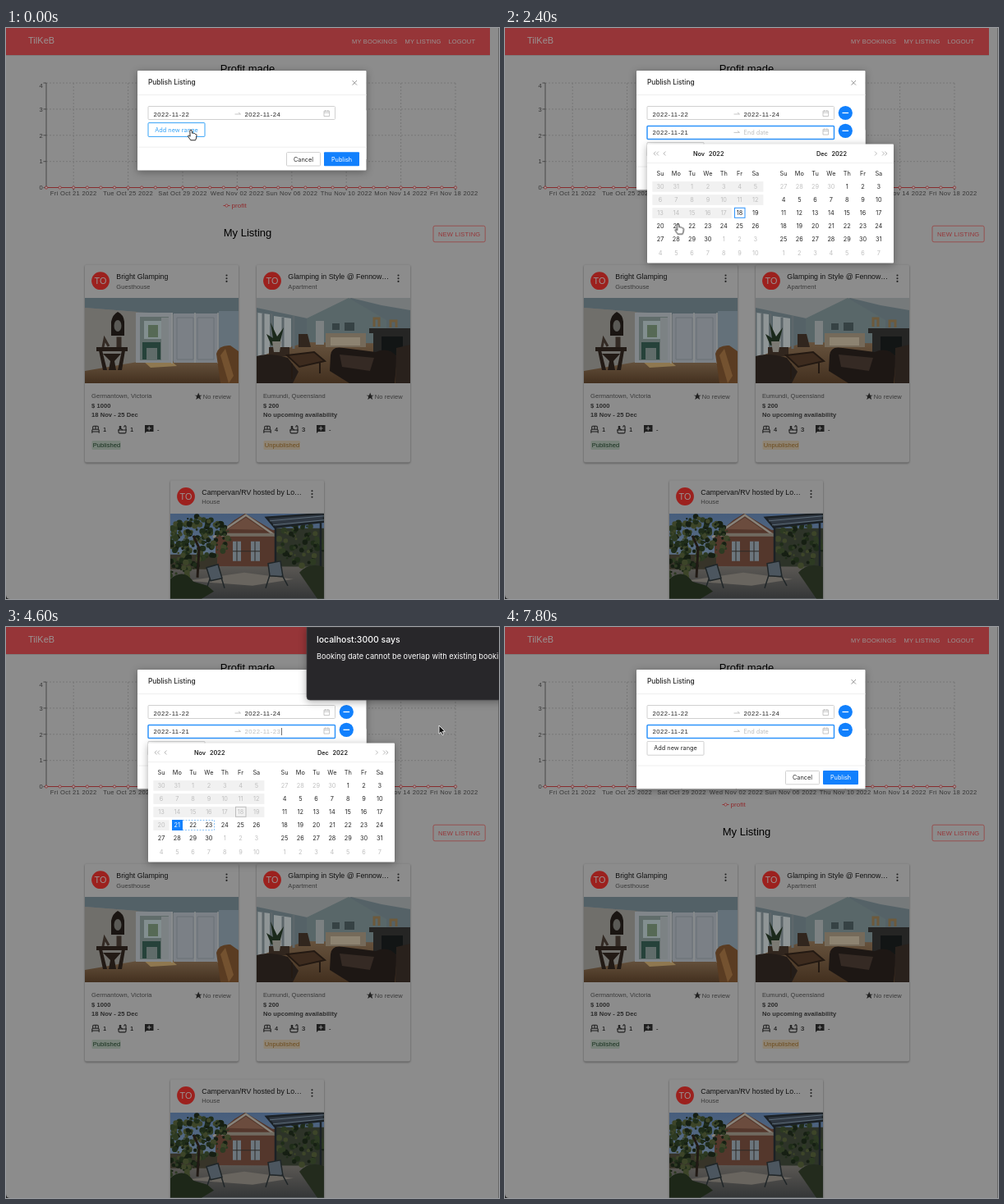
These frames come from a looping animation (600 px wide and 696 px high, 7.9 s). An HTML page:

```html
<!DOCTYPE html>
<html lang="en">
<head>
<meta charset="utf-8">
<title>Publish listing</title>
<style>
html, body { margin: 0; width: 100%; height: 100%; overflow: hidden; background: #8c8c8c; }
svg { display: block; width: 600px; height: 696px; }
text { font: 7.5px "Liberation Sans", Arial, sans-serif; letter-spacing: .08px; white-space: pre; }
.ui text { font: 7.3px Inter, "Open Sans", sans-serif; letter-spacing: 0; fill: #262626; }
.ui .date { font: 7.7px "Liberation Sans", Arial, sans-serif; letter-spacing: .5px; }
.ui .hint { fill: #bfbfbf; }
.ui .strong { font-weight: 600; }
.ui .title { font-size: 8.3px; font-weight: 500; }
.ui .light { fill: #fff; }
.mid { text-anchor: middle; }
.end { text-anchor: end; }
.h1 { font-size: 13px; letter-spacing: 0; }
.nav { font-size: 7.5px; letter-spacing: .17px; fill: #9a9494; }
.axis { font-size: 7.6px; letter-spacing: .3px; fill: #363636; }
.name { font-size: 8.8px; letter-spacing: 0; fill: #121212; }
.soft { fill: #393939; }
.bold { font-weight: bold; fill: #2a2a2a; }
.card { filter: drop-shadow(0 1px 1px #0006); }
.float { filter: drop-shadow(0 2px 5px #0005); }

.t { animation: 7.9s step-end infinite; }
.row2 { animation-name: row2; }
.grow { animation-name: grow; }
.ring { animation-name: ring; }
.addBox { animation-name: addBox; }
.ui .addText { animation-name: addText; }
.startHint { animation-name: startHint; }
.startHover { animation-name: startHover; }
.startSet { animation-name: startSet; }
.endHint { animation-name: endHint; }
.endHover { animation-name: endHover; }
.picker { animation-name: picker; }
.before { animation-name: before; }
.after { animation-name: after; }
.range { animation-name: range; }
.alert { animation-name: alert; }
.hand { animation-name: hand; }
.beam { animation-name: beam; }
.arrow { animation-name: arrow; }
.pointer { animation: move 7.9s ease-in-out infinite; }

@keyframes row2 { 0% { opacity: 0 } 6.33%, 100% { opacity: 1 } }
@keyframes grow { 0% { transform: none } 6.33%, 100% { transform: translateY(23.8px) } }
@keyframes ring { 0% { stroke: #d0d0d0; stroke-width: 1px } 15.2%, 100% { stroke: #2f94fb; stroke-width: 1.5px } }
@keyframes addBox { 0% { stroke: #36a3f7 } 15.2%, 100% { stroke: #d0d0d0 } }
@keyframes addText { 0% { fill: #36a3f7 } 15.2%, 100% { fill: #262626 } }
@keyframes startHint { 0% { opacity: 1 } 24.05%, 100% { opacity: 0 } }
@keyframes startHover { 0% { opacity: 0 } 24.05% { opacity: 1 } 30.2%, 100% { opacity: 0 } }
@keyframes startSet { 0% { opacity: 0 } 30.2%, 100% { opacity: 1 } }
@keyframes endHint { 0% { opacity: 1 } 38% { opacity: 0 } 79.75%, 100% { opacity: 1 } }
@keyframes endHover { 0% { opacity: 0 } 38% { opacity: 1 } 79.75%, 100% { opacity: 0 } }
@keyframes picker { 0% { opacity: 0 } 16.46% { opacity: 1 } 81%, 100% { opacity: 0 } }
@keyframes before { 0% { opacity: 1 } 31.6%, 100% { opacity: 0 } }
@keyframes after { 0% { opacity: 0 } 31.6%, 100% { opacity: 1 } }
@keyframes range { 0% { opacity: 0 } 38%, 100% { opacity: 1 } }
@keyframes alert { 0% { opacity: 0 } 43% { opacity: 1 } 79.75%, 100% { opacity: 0 } }
@keyframes hand { 0% { opacity: 1 } 6.33% { opacity: 0 } 24.05% { opacity: 1 } 43%, 100% { opacity: 0 } }
@keyframes beam { 0% { opacity: 0 } 6.33% { opacity: 1 } 20.2%, 100% { opacity: 0 } }
@keyframes arrow { 0% { opacity: 0 } 20.2% { opacity: 1 } 24.05% { opacity: 0 } 43%, 100% { opacity: 1 } }
@keyframes move {
  0%, 18.9% { transform: translate(225px, 124px) }
  26.5%, 32.9% { transform: translate(210.5px, 238.5px) }
  39%, 46.8% { transform: translate(245px, 246px) }
  56.9%, 59.5% { transform: translate(527px, 120px) }
  64%, 100% { transform: translate(612px, 50px) }
}
</style>
</head>
<body>
<svg viewBox="0 0 600 696">
  <defs>
    <clipPath id="frame"><path d="M0 0H187V104H0z"/></clipPath>
    <linearGradient id="floor" x2="0" y2="1"><stop stop-color="#66523d"/><stop offset="1" stop-color="#43301f"/></linearGradient>
    <linearGradient id="sky" x2="0" y2="1"><stop stop-color="#465d7c"/><stop offset="1" stop-color="#74838f"/></linearGradient>
    <linearGradient id="patio" x2="0" y2="1"><stop stop-color="#5b5854"/><stop offset="1" stop-color="#343637"/></linearGradient>
    <g id="minus"><circle r="8.6" fill="#1180fd"/><path d="M-3.8 0H3.8" stroke="#fff" stroke-width="1.3"/></g>
    <g id="field" fill="none" stroke="#b8b8b8" stroke-width=".8">
      <path d="M278.5 105H285.5L283 103M387 101.2H393.6V107.6H387zM387 103.2H393.6M388.8 100V102M391.8 100V102"/>
    </g>
    <g id="icons" fill="none" stroke="#1f1f1f" stroke-width="1.1">
      <path d="M9.7 201V198Q9.700 196.800 10.900 196.800H15.100Q16.300 196.800 16.300 198V201M13 197V200.500M8.800 205.300V202Q8.800 200.700 10 200.700H16Q17.200 200.700 17.200 202V205.300M8.800 203.500H17.200"/>
      <path d="M40 201.500H51M41 202V204Q41 205.400 42.500 205.400H48.500Q50 205.400 50 204V197.500Q49.800 196 48.500 196.300L47.500 198"/>
      <path d="M41.500 201Q42 199.500 44 200L46 201.500" />
      <circle cx="43" cy="198" r=".9" fill="#1f1f1f"/>
      <path d="M73 195.500H83.500V203.500H75L73 205.500z" fill="#1f1f1f" stroke="none"/>
      <path d="M78.200 197V202M75.700 199.500H80.700" stroke="#8c8c8c"/>
    </g>

    <g id="hall" clip-path="url(#frame)">
      <path d="M0 0H187V104H0z" fill="#6a7073"/>
      <path d="M0 0H187V20H107L64 17 0 12z" fill="#536167"/>
      <path d="M0 12L64 17V80L0 96z" fill="#706f6b"/>
      <path d="M0 89L64 78 162 77 187 84V104H0z" fill="url(#floor)"/>
      <path d="M70 76L104 76 112 83 80 85z" fill="#8f7850"/>
      <path d="M62 18H107V79H62z" fill="#81868a"/>
      <path d="M67 23H102V76H67z" fill="#606c6a"/>
      <path d="M72 28H94V50H72z" fill="#828e8f"/>
      <path d="M77 33H89V48H77z" fill="#566955"/>
      <path d="M70 54H92V75H88V61H75V75H70z" fill="#26423a"/>
      <path d="M93 24H102V76H93z" fill="#7c8284"/>
      <path d="M108 19H162V79H108z" fill="#7b8086"/>
      <path d="M112 24H132V75H112zM137 24H157V75H137z" fill="none" stroke="#6b7177"/>
      <path d="M134 18V79M106 18V80M162 18V80" stroke="#8b8d8f" stroke-width="1.500"/>
      <path d="M163 16H187V85L163 78z" fill="#64717a"/>
      <path d="M32 46V29Q34 20 40 17Q47 20 48 29V46z" fill="#1a1512"/>
      <ellipse cx="40" cy="34" rx="4.500" ry="7" fill="#5a5a56"/>
      <path d="M14 60H52V65H14zM17 64H21L27 88H22zM45 64H49L45 88H40zM22 68H44L36 77 38 88H29L31 77z" fill="#221a15"/>
      <path d="M22 60L24 50 29 59M40 60V49H43V60" fill="none" stroke="#332a24" stroke-width="3"/>
      <path d="M160 68Q163 57 177 58L187 65V104H165z" fill="#5a3c22"/>
      <path d="M165 70L171 62 181 95 175 104z" fill="#745230"/>
    </g>
    <g id="lounge" clip-path="url(#frame)">
      <path d="M0 0H187V104H0z" fill="#556267"/>
      <path d="M0 0H187V15L152 9 115 0 62 25 0 12z" fill="#767a7b"/>
      <path d="M61 25L112 0 158 27V55H61z" fill="#596769"/>
      <path d="M0 70L63 54 187 56V104H0z" fill="url(#floor)"/>
      <path d="M1 18L16 20V67L1 73zM21 22L42 25V60L21 66z" fill="#8f9596"/>
      <path d="M0 17V75M18 19V70M45 22V62M8 19V69M32 24V62" stroke="#5d666a" stroke-width="3"/>
      <path d="M72 28H82V57H72z" fill="#7c8182"/>
      <path d="M84 43H133V60H84z" fill="#756a5a"/>
      <path d="M90 48H126V58H90z" fill="#8d8371"/>
      <path d="M92 31H101V39H92zM107 30H119V40H107z" fill="#364244"/>
      <path d="M137 37H187V43H137zM142 43H187V73H142z" fill="#252524"/>
      <path d="M152 47H178V70H152z" fill="#121515"/>
      <path d="M143 35V25H149V35M163 36V28H170V36" fill="none" stroke="#6d5a3c" stroke-width="3"/>
      <path d="M51 44H62L66 60H51zM15 60H40V71H15z" fill="#31261e"/>
      <path d="M18 58L12 44 20 49 17 30 25 47 33 36 28 56z" fill="#1b291b"/>
      <path d="M19 53H30L28 66H21z" fill="#7b7a73"/>
      <path d="M0 71Q15 66 38 73L51 90 44 104H0z" fill="#231c18"/>
      <path d="M37 70L70 66 83 77 52 84zM43 80V99M77 78V92" fill="#3d2b1e" stroke="#231912" stroke-width="2"/>
      <path d="M90 70Q91 58 106 61L145 66Q161 59 171 72L168 104H113L89 89z" fill="#1d1714"/>
      <path d="M101 69L143 73 138 89 104 84z" fill="#352a24"/>
      <path d="M170 61L187 57V104H169z" fill="#29211c"/>
    </g>
    <g id="cottage" clip-path="url(#frame)">
      <path d="M0 0H187V104H0z" fill="url(#sky)"/>
      <path d="M55 28L78 8 91 0 124 20 187 24V76H55z" fill="#54372c"/>
      <path d="M52 29L92 2 132 30" fill="none" stroke="#88837a" stroke-width="2.500"/>
      <path d="M70 19L92 5 114 20z" fill="#6b4c3e"/>
      <path d="M62 24H127V28H62z" fill="#706a60"/>
      <path d="M76 34H86V58H76zM98 34H109V58H98z" fill="#6c767d"/>
      <path d="M81 34V58M103 34V58M76 46H109" stroke="#2c2926"/>
      <path d="M128 18H187V67H128z" fill="#2d3328"/>
      <path d="M0 64L187 65V104H0z" fill="url(#patio)"/>
      <path d="M0 50H57V68H0z" fill="#373429"/>
      <path d="M20 82L90 72 150 80 100 88z" fill="#69655f"/>
      <g id="leaves"></g>
      <path d="M33 78L35 42 28 27" fill="none" stroke="#211a15" stroke-width="3"/>
      <path d="M117 5L187 0V10L127 17zM128 16V72M183 10V84" fill="#2e3640" stroke="#1b2125" stroke-width="2.500"/>
      <path d="M121 9L187 3M125 14L187 8" stroke="#5b6a76"/>
      <path d="M44 66L58 62 63 79 49 82zM48 80L44 92M62 78L66 91M119 61L134 58 137 77 121 76zM121 75L116 91M136 75L143 88" fill="#4c565f" stroke="#202628" stroke-width="1.500"/>
      <path d="M0 80Q16 66 28 83L45 88 53 95 38 104H0z" fill="#1d2718"/>
      <path d="M157 72Q168 59 187 65V104H179z" fill="#232b1d"/>
    </g>
  </defs>

  <rect width="600" height="696" fill="#8c8c8c"/>
  <rect width="589" height="33" fill="#963538"/>
  <path d="M0 33.500H589" stroke="#777" opacity=".6"/>
  <path d="M599.500 0V696" stroke="#686868"/>
  <path d="M0 691Q0 696 5 696H0z" fill="#222"/>
  <text x="27" y="19" style="font-size:10.900px;fill:#9a9494">TilKeB</text>
  <text class="nav" x="421" y="18.500">MY BOOKINGS</text>
  <text class="nav" x="485.500" y="18.500">MY LISTING</text>
  <text class="nav" x="538.500" y="18.500">LOGOUT</text>
  <text class="h1 mid" x="294" y="54">Profit made</text>
  <g id="chart"></g>
  <text class="h1 mid" x="294" y="253.600">My Listing</text>
  <rect x="520" y="241.200" width="63.200" height="19.600" rx="2" fill="none" stroke="#98403f" stroke-width=".8"/>
  <text class="mid" x="551.700" y="253.800" style="font-size:7.600px;letter-spacing:.2px;fill:#963538">NEW LISTING</text>
  <g id="cards"></g>

  <g class="ui">
    <g class="float">
      <path d="M160 53Q160 52 161 52H437.500Q438.500 52 438.500 53V160H160z" fill="#fff"/>
      <rect class="t grow" x="160" y="100" width="278.500" height="73.500" rx="1" fill="#fff"/>
    </g>
    <text class="title" x="173" y="69.300">Publish Listing</text>
    <path d="M421.500 64L427 69.500M427 64L421.500 69.500" stroke="#8c8c8c" stroke-width=".9"/>
    <path d="M160 81.500H438.500" stroke="#efefef"/>
    <rect x="173" y="95.500" width="227.500" height="16" rx="1" fill="#fff" stroke="#d0d0d0"/>
    <use href="#field"/>
    <text class="date" x="179.500" y="107.700">2022-11-22</text>
    <text class="date" x="290.500" y="107.700">2022-11-24</text>
    <g class="t grow">
      <rect class="t addBox" x="173" y="115.600" width="69" height="16.800" rx="1" fill="#fff"/>
      <text class="t addText mid" x="207.500" y="126.700">Add new range</text>
      <path d="M160 145.200H438.500" stroke="#efefef"/>
      <rect x="341.500" y="151.600" width="41" height="16.400" rx="1" fill="#fff" stroke="#d0d0d0"/>
      <text class="mid" x="362" y="162.600">Cancel</text>
      <rect x="387" y="151.300" width="43" height="17" rx="1" fill="#1180fd"/>
      <text class="mid light" x="408.500" y="162.600">Publish</text>
    </g>
    <g class="t row2">
      <use href="#minus" x="414.300" y="103.500"/>
      <use href="#minus" x="414.300" y="125.300"/>
      <rect class="t ring" x="173" y="119.500" width="227.500" height="16" rx="1" fill="#fff"/>
      <use href="#field" y="22.400"/>
      <text class="t startHint hint" x="179.500" y="130.200">Start date</text>
      <text class="t startHover date hint" x="179.500" y="130.200">2022-11-21</text>
      <text class="t startSet date" x="179.500" y="130.200">2022-11-21</text>
      <text class="t endHint hint" x="290.500" y="130.200">End date</text>
      <g class="t endHover">
        <text class="date hint" x="290.500" y="130.200">2022-11-23</text>
        <path d="M335.500 123V132" stroke="#333" stroke-width=".7"/>
      </g>
    </g>
    <g class="t picker">
      <rect class="float" x="173" y="141.500" width="300" height="145" rx="1" fill="#fff"/>
      <path d="M173 164.500H473" stroke="#f0f0f0"/>
      <path d="M183.500 150.500L181 153 183.500 155.500M187 150.500L184.500 153 187 155.500M195.500 150.500L193 153 195.500 155.500M450 150.500L452.500 153 450 155.500M459 150.500L461.500 153 459 155.500M462.500 150.500L465 153 462.500 155.500" fill="none" stroke="#aaa" stroke-width=".8"/>
      <text class="strong" x="229" y="155.500">Nov</text><text class="strong" x="248" y="155.500">2022</text>
      <text class="strong" x="379" y="155.500">Dec</text><text class="strong" x="397.500" y="155.500">2022</text>
      <g id="december"></g>
      <g class="t before" id="november"></g>
      <g class="t after">
        <g id="chosen"></g>
        <rect x="202" y="235" width="13" height="13" fill="#1180fd"/>
        <text class="mid light" x="208.300" y="244.300">21</text>
        <path class="t range" d="M215 235.500H253.500V247.500H215" fill="none" stroke="#7dbcf5" stroke-width=".9" stroke-dasharray="2 1.500"/>
      </g>
    </g>
    <g class="t alert">
      <path class="float" d="M366 0H604V89H370Q366 89 366 85z" fill="#28272a" stroke="#4a494c" stroke-width=".7"/>
      <text class="light" x="378" y="18.800" style="font-size:10.500px;font-weight:500">localhost:3000 says</text>
      <text class="light" x="378" y="39.300" style="font-size:9.200px">Booking date cannot be overlap with existing booking</text>
    </g>
  </g>

  <g class="pointer">
    <path class="t hand" d="M-1.200 .8Q0-.8 1.200 .8L1.600 4.300Q2.800 3.600 3.500 4.600Q4.800 4.200 5.300 5.300Q6.800 5 7 6.600L6.600 10 5.600 12.800H-.2L-3.200 8.500Q-4 7-2.400 7L-.9 8.200z" fill="#fff" stroke="#111" stroke-width=".9"/>
    <path class="t beam" d="M-2-5.500Q0-5.500 0-4Q0-5.500 2-5.500M0-4.500V6M-2 7Q0 7 0 5.500Q0 7 2 7" fill="none" stroke="#111" stroke-width="1.100"/>
    <path class="t arrow" d="M0 0V10.200L2.400 8.100 4 11.600 5.800 10.800 4.200 7.400H7.300z" fill="#111" stroke="#fff" stroke-width=".8"/>
  </g>
</svg>
<script>
const put = (id, markup) => document.getElementById(id).innerHTML = markup;
const label = (x, y, cls, s) => `<text x="${x}" y="${y}" class="${cls}">${s}</text>`;
const times = (n, f) => Array.from({ length: n }, (_, i) => f(i)).join('');

function chart() {
  const red = '#8f2a2c', step = 16.6;
  const days = ['Fri Oct 21', 'Tue Oct 25', 'Sat Oct 29', 'Wed Nov 02', 'Sun Nov 06', 'Thu Nov 10', 'Mon Nov 14', 'Fri Nov 18'];
  const rows = times(4, i => `M49 ${67 + i * 31.9}H547`);
  const cols = times(8, i => `M${82.2 + i * step * 4} 67V194.500`);
  const ticks = times(5, i => `M45.500 ${67 + i * 31.9}H49`) + times(8, i => `M${82.2 + i * step * 4} 194.500V198`);
  return `<path d="${rows}${cols}" stroke="#727272" stroke-width=".8" stroke-dasharray="2 2"/>
    <path d="M49 67V194.500H547${ticks}" fill="none" stroke="#383838" stroke-width=".8"/>
    <path d="M49 194.500H547M264.500 216.500H272.500" stroke="${red}" stroke-width=".9"/>
    <g fill="#a0a0a0" stroke="${red}" stroke-width=".8">
      ${times(31, i => `<circle cx="${49 + i * step}" cy="194.500" r="1.600"/>`)}<circle cx="268.500" cy="216.500" r="1.600"/></g>`
    + times(5, i => label(45, i ? 69.7 + i * 31.9 : 73.3, 'axis end', 4 - i))
    + days.map((d, i) => label(i < 7 ? 82.2 + i * step * 4 : 545.3, 204.2, 'axis mid', d + ' 2022')).join('')
    + `<text x="274.500" y="219" style="font-size:8px;fill:${red}">profit</text>`;
}

function card(x, y, c) {
  const [bg, ink, w] = c.status === 'Published' ? ['#78827a', '#17301e', 35] : ['#8e8372', '#6b4a1c', 44.5];
  const details = !c.place ? '' : label(8, 162.5, 'soft', c.place) + label(8, 174.5, 'bold', c.price) + label(8, 185, 'bold', c.dates)
    + '<path transform="translate(138.200 160.700)" d="M0-4.700L1.300-1.500 4.700-1.400 2-.1 2.900 3.700 0 1.700-2.900 3.700-2-.1-4.700-1.400-1.300-1.500z" fill="#222"/>'
    + label(143.8, 163.7, 'soft', 'No review') + '<use href="#icons"/>'
    + label(22, 203.7, '', c.beds) + label(55, 203.7, '', c.baths) + label(88, 203.7, '', '-')
    + `<rect x="8.500" y="214.500" width="${w}" height="11" rx="1.500" fill="${bg}"/><text x="9.700" y="222.500" fill="${ink}">${c.status}</text>`;
  return `<g transform="translate(${x} ${y})">
    <rect class="card" width="187" height="241" rx="2" fill="#8c8c8c"/>
    <circle cx="19" cy="19.700" r="10.900" fill="#9c211e"/>
    <text class="mid" x="19" y="23.600" style="font-size:10.800px;fill:#9a9494">TO</text>`
    + label(38.3, 17.8, 'name', c.name) + label(38.3, 29, 'soft', c.kind)
    + times(3, i => `<circle cx="172.500" cy="${13 + i * 3.7}" r="1.050" fill="#222"/>`)
    + `<use href="#${c.photo}" y="40.500"/>${details}</g>`;
}

// Six weeks of day cells; the first `off` of them are disabled.
function month(x, lead, prev, len, off) {
  const strips = times(Math.ceil(off / 7), r =>
    `<rect x="${x - 9.65}" y="${187 + r * 16.1}" width="${Math.min(7, off - r * 7) * 19.3}" height="12.700" fill="#f1f1f1"/>`);
  const week = ['Su', 'Mo', 'Tu', 'We', 'Th', 'Fr', 'Sa'].map((d, i) => label(x + i * 19.3, 179.5, 'mid', d)).join('');
  const cells = times(42, i => {
    const day = i - lead + 1, inside = day > 0 && day <= len;
    const shown = day < 1 ? day + prev : inside ? day : day - len;
    return label(x + i % 7 * 19.3, 196 + Math.floor(i / 7) * 16.1, inside && i >= off ? 'mid' : 'mid hint', shown);
  });
  return strips + week + cells;
}
const today = color => `<rect x="279.500" y="219.300" width="12.500" height="12" fill="none" stroke="${color}"/>`;

let seed = 7;
const rnd = () => (seed = seed * 16807 % 2147483647) / 2147483647;
function leaves(n, cx, cy, rx, ry) {
  const tones = ['#1f2c19', '#2d3a22', '#3d4529', '#161f13'];
  return times(n, i => {
    const a = rnd() * 6.28, d = Math.sqrt(rnd());
    return `<circle cx="${cx + Math.cos(a) * d * rx}" cy="${cy + Math.sin(a) * d * ry}" r="${1 + rnd() * 3}" fill="${tones[i % 4]}"/>`;
  });
}

put('leaves', leaves(190, 35, 30, 38, 27) + leaves(70, 158, 38, 29, 26) + leaves(40, 12, 66, 22, 12));
put('chart', chart());
put('cards',
  card(96, 288.5, { name: 'Bright Glamping', kind: 'Guesthouse', photo: 'hall', place: 'Germantown, Victoria', price: '$ 1000', dates: '18 Nov - 25 Dec', beds: 1, baths: 1, status: 'Published' })
  + card(305, 288.5, { name: 'Glamping in Style @ Fennow…', kind: 'Apartment', photo: 'lounge', place: 'Eumundi, Queensland', price: '$ 200', dates: 'No upcoming availability', beds: 4, baths: 3, status: 'Unpublished' })
  + card(200, 551.3, { name: 'Campervan/RV hosted by Lo…', kind: 'House', photo: 'cottage' }));
put('december', month(339, 4, 30, 31, 0));
put('november', month(189, 2, 31, 30, 19) + today('#2f94fb'));
put('chosen', month(189, 2, 31, 30, 22) + today('#bdbdbd'));
</script>
</body>
</html>
```
